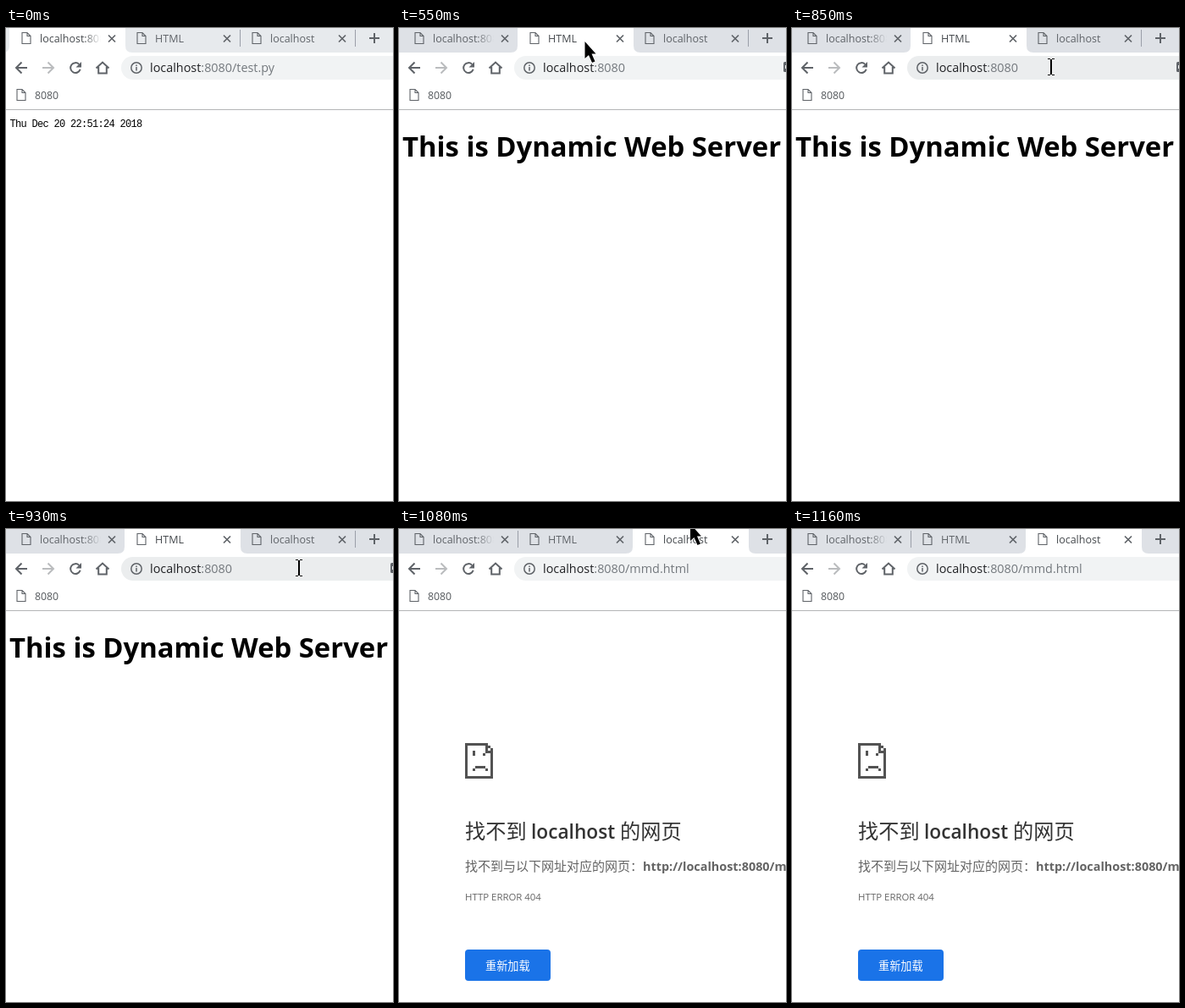
An HTML page with a canvas for the animation above (1.47 s loop, 457 by 559 pixels).

```html
<!DOCTYPE html>
<html lang="zh-CN">
<head>
<meta charset="utf-8">
<title>Browser tabs</title>
<style>
html, body { margin: 0; width: 100%; height: 100%; overflow: hidden; background: #fff; }
canvas { display: block; }
</style>
</head>
<body>
<canvas id="stage" width="457" height="559"></canvas>
<script>
const W = 457, H = 559, LOOP = 1470;
const ctx = document.getElementById('stage').getContext('2d');
const SANS = '"Open Sans", "Noto Sans", sans-serif';
const CJK = '"Noto Sans CJK SC", "Noto Sans CJK", sans-serif';
const GRAY = '#5f6368';

const tabs = ['localhost:8080', 'HTML', 'localhost'];
const tabX = i => 4 + 136 * i;
const pages = [
  { path: '/test.py', strip: '#e7eaed', seps: [276.5, 412.5], draw: timePage },
  { path: '', strip: '#dee1e6', seps: [412.5], draw: headingPage },
  { path: '/mmd.html', strip: '#dee1e6', seps: [140.5], draw: errorPage }
];

// start time, active tab, cursor kind and its position
const steps = [
  [0, 0],
  [550, 1, pointer, 219.5, 16],
  [700, 1, pointer, 222.5, 18],
  [780, 1, pointer, 246, 27],
  [850, 1, beam, 306, 46],
  [930, 1, beam, 346, 46],
  [1010, 2, pointer, 340.5, 7.5],
  [1080, 2, pointer, 344, -6],
  [1160, 2]
];

function text(str, x, y, font, color) {
  ctx.font = font;
  ctx.fillStyle = color;
  ctx.fillText(str, x, y);
  return x + ctx.measureText(str).width;
}

function rect(x, y, w, h, color) {
  ctx.fillStyle = color;
  ctx.fillRect(x, y, w, h);
}

function pill(x, y, w, h, r, color) {
  ctx.fillStyle = color;
  ctx.beginPath();
  ctx.roundRect(x, y, w, h, r);
  ctx.fill();
}

function stroke(d, color, width, x = 0, y = 0) {
  ctx.save();
  ctx.translate(x, y);
  ctx.strokeStyle = color;
  ctx.lineWidth = width;
  ctx.stroke(new Path2D(d));
  ctx.restore();
}

function docIcon(x, y, color) {
  stroke('M.5 .5H6.5L10.5 4.5V13.5H.5ZM6.5 .5V4.5H10.5', color, 1.1, x, y);
}

function tabShape(x) {
  const r = x + 137;
  ctx.fillStyle = '#fff';
  ctx.fill(new Path2D(
    `M${x - 8} 29Q${x} 29 ${x} 21V0H${r}V21Q${r} 29 ${r + 8} 29Z`));
}

function tabLabel(i, active) {
  const x = tabX(i);
  const color = active ? '#45494d' : GRAY;
  let fill = color;
  if (i === 0) {
    fill = ctx.createLinearGradient(x + 88, 0, x + 108, 0);
    fill.addColorStop(0, color);
    fill.addColorStop(1, color + '00');
  }
  docIcon(x + 14.5, 5, GRAY);
  text(tabs[i], x + 36, 17, '12.5px ' + SANS, fill);
  stroke('M-4 -4L4 4M4 -4L-4 4', GRAY, 1.7, x + 121, 12.5);
}

function toolbar(page, hover) {
  const arrow = 'M7 0H-6M.5 -6.5L-6 0L.5 6.5';
  stroke(arrow, GRAY, 2, 18, 47);
  ctx.save();
  ctx.translate(50, 47);
  ctx.scale(-1, 1);
  stroke(arrow, '#babcbe', 2);
  ctx.restore();

  stroke('M4.3 -4.1A5.9 5.9 0 1 0 5.7 1.8', GRAY, 2, 82, 47);
  ctx.fillStyle = GRAY;
  ctx.fill(new Path2D('M89 40V46.5H82.5Z'));
  stroke('M-7.5 .5L0 -6.5L7.5 .5M-4.8 -1V6.5H4.8V-1', GRAY, 2, 114, 47);

  pill(136, 33, 360, 28, 14, hover ? '#ebedee' : '#f1f3f4');
  stroke('M6.2 0A6.2 6.2 0 1 1 -6.2 0A6.2 6.2 0 1 1 6.2 0M0 -1V3.6M0 -3.6V-2', GRAY, 1.5, 154, 47);
  const font = '14.4px ' + SANS;
  const end = text('localhost', 170, 52, font, '#202124');
  text(':8080' + page.path, end, 52, font, '#73787d');
  if (!page.path) {
    pill(454, 40, 12, 12, 1.5, GRAY);
    rect(456, 44, 3, 4, '#f1f3f4');
  }

  docIcon(12.5, 72, GRAY);
  text('8080', 34, 84, '12.3px ' + SANS, '#54585c');
  rect(0, 96, W, 1, '#b4b5b6');
}

function timePage() {
  ctx.letterSpacing = '-0.7px';
  text('Thu Dec 20 22:51:24 2018', 4.5, 117, '12px "Liberation Mono", monospace', '#000');
  ctx.letterSpacing = '0px';
}

function headingPage() {
  text('This is Dynamic Web Server', 4, 152, 'bold 32.8px ' + SANS, '#000');
}

function sadDoc(x, y) {
  const cells = [
    [0, 0, 9, 1], [0, 0, 1, 14], [0, 13, 11, 1], [10, 2, 1, 12],
    [9, 1, 1, 1], [8, 1, 1, 3], [8, 3, 3, 1],
    [3, 3, 1, 2], [7, 4, 1, 1],
    [4, 9, 4, 1], [3, 10, 1, 1], [8, 10, 1, 1]
  ];
  for (const [cx, cy, w, h] of cells) rect(x + cx * 3, y + cy * 3, w * 3, h * 3, '#535353');
}

function errorPage() {
  sadDoc(78, 253);
  const big = '24.2px ' + CJK;
  text('找不到', 78, 366, big, '#333');
  text('localhost', 156, 366, '600 22.7px ' + SANS, '#333');
  text('的网页', 261, 366, big, '#333');
  text('找不到与以下网址对应的网页：', 78, 404, '15px ' + CJK, '#646464');
  text('http://localhost:8080/mmd.html', 288, 404, 'bold 14.4px ' + SANS, '#646464');
  text('HTTP ERROR 404', 78, 439, '11.4px ' + SANS, '#646464');
  pill(78, 497, 101, 37, 4, '#1a73e8');
  text('重新加载', 102, 521, '13.2px ' + CJK, '#fff');
}

function pointer(x, y) {
  ctx.save();
  ctx.translate(x, y);
  const arrow = new Path2D('M0 0V20L4.5 16L8.5 25L12 23.5L8 14.5H13Z');
  ctx.strokeStyle = '#fff';
  ctx.lineWidth = 1.5;
  ctx.stroke(arrow);
  ctx.fillStyle = '#000';
  ctx.fill(arrow);
  ctx.restore();
}

function beam(x, y) {
  rect(x - 1, y - 9, 2, 18, '#000');
  for (const dy of [-10, 9]) {
    rect(x - 4, y + dy, 3, 1, '#000');
    rect(x + 1, y + dy, 3, 1, '#000');
  }
}

function draw(now) {
  const t = now % LOOP;
  const [, active, cursor, x, y] = steps.findLast(s => s[0] <= t);
  const page = pages[active];
  rect(0, 0, W, H, '#fff');
  rect(0, 0, W, 29, page.strip);
  tabShape(tabX(active));
  for (const s of page.seps) rect(s - 0.5, 2, 1, 20, '#9a9ea8');
  tabs.forEach((_, i) => tabLabel(i, i === active));
  stroke('M-6 0H6M0 -6V6', GRAY, 2, 435, 12);
  toolbar(page, cursor === beam);
  page.draw();
  if (cursor) cursor(x, y);
}

const start = performance.now();
function tick() {
  draw(performance.now() - start);
  requestAnimationFrame(tick);
}
tick();
</script>
</body>
</html>
```
